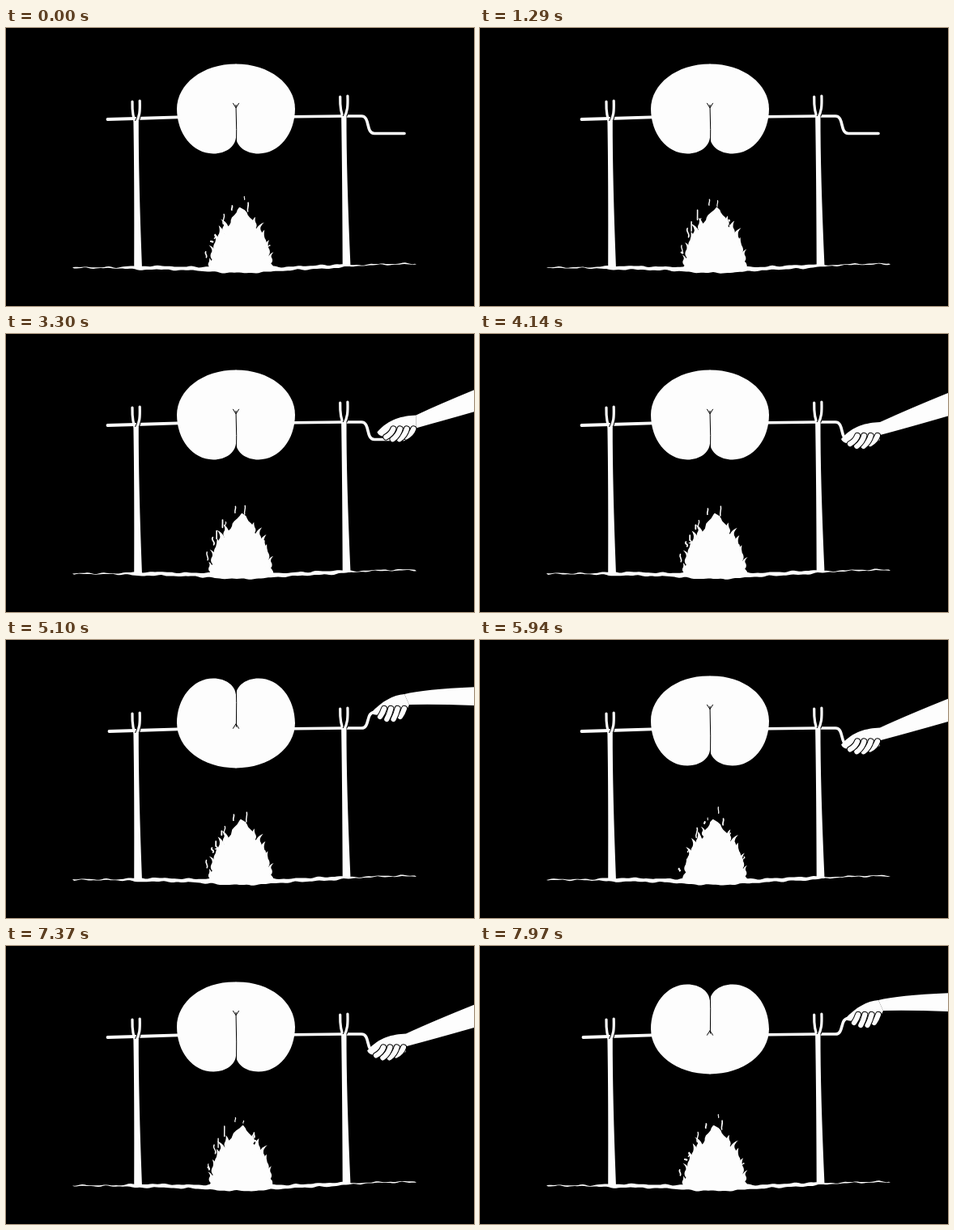
An HTML page with a canvas that plays this animation: 578 px wide and 344 px high, repeating every 8 s.

```html
<!DOCTYPE html>
<html lang="en">
<head>
<meta charset="utf-8">
<title>Campfire spit</title>
<style>
html, body { margin: 0; width: 100%; height: 100%; overflow: hidden; background: #000; }
canvas { display: block; width: 578px; height: 344px; }
</style>
</head>
<body>
<canvas id="stage" width="578" height="344"></canvas>
<script>
const ctx = document.getElementById('stage').getContext('2d');
const WHITE = '#fdfdfd', BLACK = '#000';
const LOOP = 8000, FIRE_CYCLE = 994, DRAWINGS = 12;
const TURN_START = 4375, TURN_TIME = 1434;
const FIRE_X = 290, FIRE_Y = 297, FIRE_HEIGHT = 75;
const { PI, sin, cos, min, max, floor, exp } = Math;
const TAU = PI * 2;
const mix = (a, b, k) => a + (b - a) * k;
const clamp = v => max(0, min(1, v));
const smooth = v => { v = clamp(v); return v * v * (3 - 2 * v); };
const random = seed => { const v = sin(seed * 127.1 + 3.7) * 43758.5453; return v - floor(v); };

function fillPath(path) {
  ctx.fillStyle = WHITE;
  ctx.fill(new Path2D(path));
}

function strokePath(path, width, color = WHITE) {
  ctx.lineWidth = width;
  ctx.strokeStyle = color;
  ctx.stroke(new Path2D(path));
}

function outlined(path, width) {
  strokePath(path, width + 2, BLACK);
  strokePath(path, width);
}

function drawGround(drawing) {
  const middle = x => 296.6 + 2.4 * exp(-(((x - 290) / 70) ** 2)) - 4.8 * smooth((x - 330) / 180)
    + .5 * sin(x * .19 + sin(x * .05)) + .3 * sin(x * .43 + drawing * 2.1);
  const half = x => .6 + 1.6 * smooth((x - 135) / 30) * (1 - smooth((x - 405) / 30))
    + 1.8 * exp(-(((x - 290) / 42) ** 4)) + .25 * sin(x * .31 + drawing);
  ctx.beginPath();
  for (let x = 82; x <= 507; x += 3) ctx.lineTo(x, middle(x) - half(x));
  for (let x = 507; x >= 82; x -= 3) ctx.lineTo(x, middle(x) + half(x));
  ctx.fillStyle = WHITE;
  ctx.fill();
}

function drawRod(c) {
  strokePath(`M${126.5 - c} 113 L160 112 L212 110.3`, 3.8);
  const y = 110 + 20.5 * c;
  strokePath(`M356 109.8 L417 109 L439 109 C450 109 444 ${y} 455 ${y} L492 ${y}`, 3.6);
}

// A forked post; the rod rests between its prongs.
function drawPost(x, top, foot, footX) {
  const fork = top + 25;
  strokePath(`M${x - 4.6} ${top + 1} Q${x - 5} ${fork - 5} ${x} ${fork + 3}`, 3.2);
  outlined(`M${x + 4.6} ${top} C${x + 5} ${fork - 12} ${x + 4.6} ${fork - 6} ${x} ${fork + 3}`, 3.2);
  fillPath(`M${x - 3.2} ${fork} L${x + 3.2} ${fork} Q${x + 3} ${fork + 70} ${footX + 5} ${foot}
    L${footX - 4.8} ${foot} Q${x - 2} ${fork + 70} ${x - 3.2} ${fork}Z`);
}

function drawRoast(turn) {
  const c = cos(turn * TAU), cx = 284, rx = 73, ry = 55.5, cy = 101.5 - 1.5 * c;
  const depth = v => 20 * ((1 + v) / 2) ** 2;
  const quarter = (sx, sy, d) => {
    const w = 28 * (d / 20) ** .3;
    const X = v => cx + sx * v, Y = v => cy + sy * v;
    fillPath(`M${X(-.4)} ${Y(-.4)} L${X(-.4)} ${Y(ry - d)} L${cx} ${Y(ry - d)}
      C${X(w * .04)} ${Y(ry - d * .45)} ${X(w * .43)} ${Y(ry)} ${X(w)} ${Y(ry)}
      C${X(mix(w, rx, .56))} ${Y(ry)} ${X(rx)} ${Y(ry * .56)} ${X(rx)} ${Y(-.4)}Z`);
  };
  for (const sx of [-1, 1]) {
    quarter(sx, 1, depth(c));
    quarter(sx, -1, depth(-c));
  }

  // The crease covers half the circumference; only its front part shows.
  const start = -(turn % 1) * TAU, edge = PI / 2, extra = .085;
  const yAt = a => cy + ry * sin(a);
  const fork = (angle, dir) => {
    const y = yAt(angle), h = 3.5 * cos(angle), arm = y + dir * h * .6;
    strokePath(`M${cx - 3.5} ${arm} L${cx} ${y - dir * h} L${cx + 3.5} ${arm}`, 1, BLACK);
  };
  for (const a of [start, start + TAU]) {
    const from = a - extra, to = a + PI + extra;
    const top = max(from, -edge), bottom = min(to, edge);
    if (top >= bottom) continue;
    const y1 = yAt(top), y2 = yAt(bottom);
    strokePath(`M${cx} ${y1} Q${cx + 1.2} ${(y1 + y2) / 2} ${cx + .4} ${y2}`, 1, BLACK);
    if (top === from) fork(top, -1);
    if (bottom === to) fork(bottom, 1);
  }
}

// Half the width of the fire at a height above the ground.
const fireHalf = h => 40 * max(0, 1 - h / FIRE_HEIGHT) ** .72;

function drawCore(phase) {
  const lean = h => 2 * sin(TAU * phase - h * .09) * h / FIRE_HEIGHT;
  ctx.beginPath();
  for (const s of [-1, 1]) {
    for (let i = 0; i <= 24; i++) {
      const h = FIRE_HEIGHT * (s < 0 ? i : 24 - i) / 24;
      const ripple = 1.2 * sin(h * .45 - TAU * phase + s);
      ctx.lineTo(FIRE_X + lean(h) + s * max(0, fireHalf(h) + ripple), FIRE_Y - h);
    }
  }
  ctx.fillStyle = WHITE;
  ctx.fill();
}

// Tongues climb the sides, one place per cycle, and curl at the tip.
function drawTongues(phase) {
  const count = 5;
  for (const s of [-1, 1]) {
    for (let i = 0; i < count; i++) {
      const rise = (i + (phase + (s > 0 ? .45 : 0)) % 1) / count;
      const h = 5 + 54 * rise, size = .5 + .55 * sin(PI * rise);
      const curl = 3 * sin(TAU * phase + i * 2.3 + s);
      const x = FIRE_X + s * fireHalf(h), y = FIRE_Y - h;
      const X = v => x + s * v * size, Y = v => y + v * size;
      fillPath(`M${X(-6)} ${Y(11)} C${X(6)} ${Y(7)} ${X(6)} ${Y(0)} ${X(2.5)} ${Y(-5)}
        Q${X(1)} ${Y(-9)} ${X(4 + curl)} ${Y(-15)}
        C${X(-3)} ${Y(-11)} ${X(-3)} ${Y(-5)} ${X(-7)} ${Y(0)}Z`);
    }
  }
}

// Loose wisps and sparks drift up along the outline and above the peak.
function drawWisps(phase) {
  const count = 18;
  for (let i = 0; i < count; i++) {
    const s = i % 2 ? 1 : -1;
    const u = ((phase + random(i)) % 1) / .6;
    if (u > 1) continue;
    const h = 10 + 66 * i / count + 14 * u;
    const x = FIRE_X + s * (fireHalf(h) + 4 + 3 * random(i + 40)) - 2;
    const tall = (4 + 10 * random(i + 80)) * sin(PI * u);
    const bend = 3 * (random(i + 120) - .5), y = FIRE_Y - h;
    strokePath(`M${x} ${y} c${-bend * 2} ${-tall * .4} ${bend * 3} ${-tall * .6} ${bend} ${-tall}`,
      mix(2, 1, u));
  }
}

// Swing is 0 with the crank down and 1 with it up.
function drawHand(t, swing) {
  if (t < 2540) return;
  const away = 1 - clamp((t - 2480) / 900);
  const m = (down, up) => mix(down, up, swing);
  ctx.save();
  ctx.translate(140 * away ** 1.6, -62 * away ** 1.3);

  const wristTop = `${m(494, 492)} ${m(109, 67)}`, wristLow = `${m(494, 498)} ${m(125, 80)}`;
  fillPath(`M${wristTop} Q${m(535, 520)} ${m(90, 60)} 600 ${m(64, 57.5)}
    L600 ${m(95, 82)} Q${m(535, 540)} ${m(114, 79)} ${wristLow}Z`);
  const tip = `${m(446, 451)} ${m(130, 90)}`;
  fillPath(`M${wristTop} C${m(477, 478)} ${m(110, 68)} ${m(461, 464)} ${m(113, 76)} ${tip}
    Q${m(449, 454)} ${m(137, 94)} ${m(460, 465)} ${m(135, 92)}
    L${m(485, 492)} ${m(133, 90)} Q${m(492, 496)} ${m(130, 86)} ${wristLow}Z`);

  for (let i = 3; i >= 0; i--) {
    const x = m(457, 462) + 8.3 * i, y = m(136, 95) + 3.4 * sin(PI * i / 3);
    const rootX = x + m(9, 5), rootY = m(126, 85);
    outlined(`M${rootX} ${rootY} Q${rootX - 2} ${mix(rootY, y, .6)} ${x} ${y}`, 6.2);
  }
  ctx.restore();
}

// The picture is held on a slightly uneven beat.
function heldTime(t) {
  return t < 1750 ? floor(t / 116.8) * 116.8 : 1750 + floor((t - 1750) / 119.4) * 119.4;
}

function draw(now) {
  const t = heldTime(now % LOOP);
  const drawing = floor(t / FIRE_CYCLE * DRAWINGS) % DRAWINGS;
  const phase = drawing / DRAWINGS;
  const u = max(0, (t - TURN_START) / TURN_TIME);
  const turn = u - .09 * sin(TAU * u);
  const c = cos(TAU * turn);

  ctx.fillStyle = BLACK;
  ctx.fillRect(0, 0, 578, 344);
  ctx.lineCap = ctx.lineJoin = 'round';
  drawGround(drawing);
  drawRod(c);
  drawPost(160.6, 90, 297, 163);
  drawPost(417.3, 84, 295, 420.5);
  drawRoast(turn);
  drawCore(phase);
  drawTongues(phase);
  drawWisps(phase);
  drawHand(t, (1 - c) / 2);
}

const began = performance.now();
function loop() {
  draw(performance.now() - began);
  requestAnimationFrame(loop);
}
loop();
</script>
</body>
</html>
```
